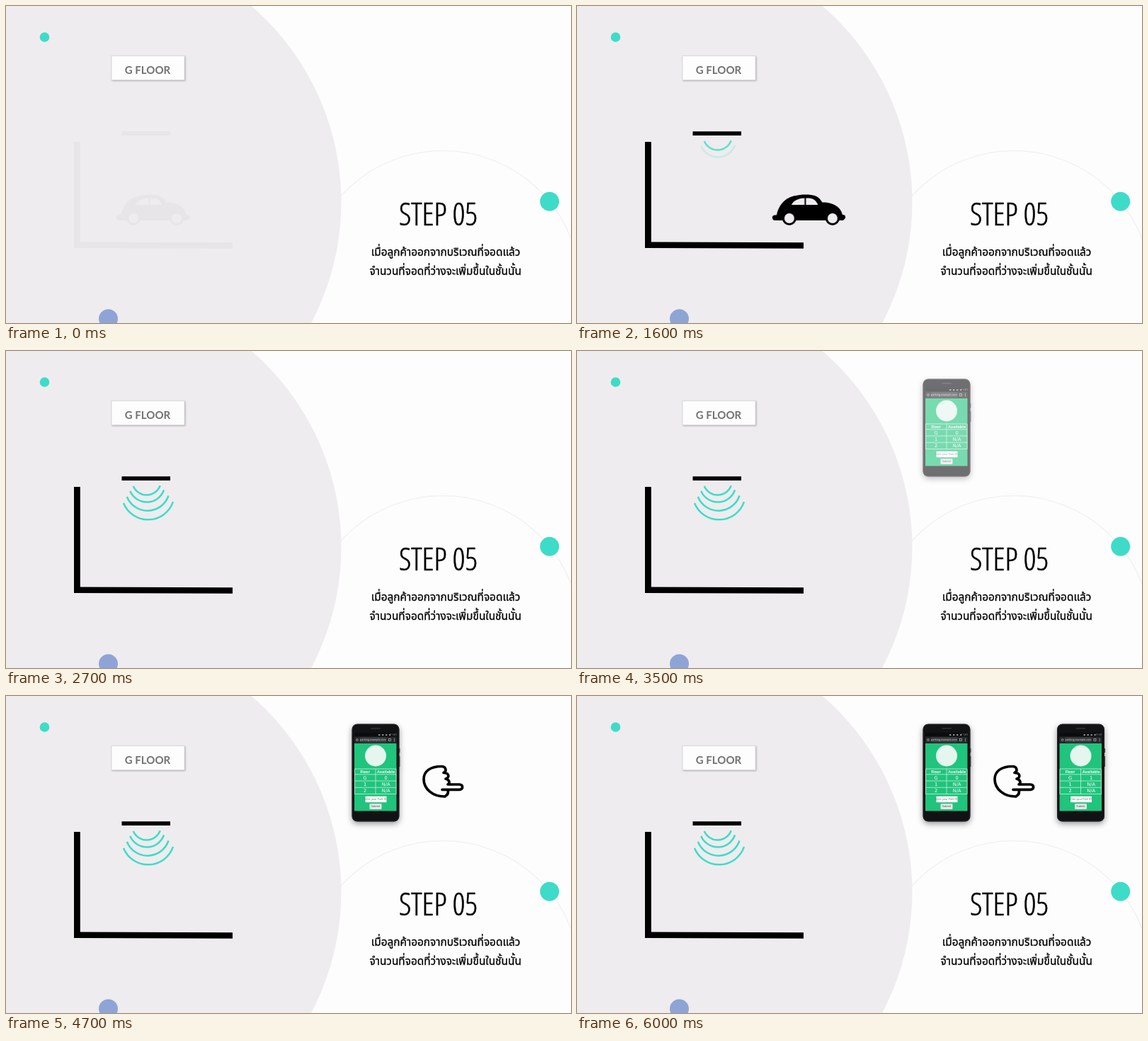
Animation of 798 by 448 pixels, one loop 6300 ms. Source, as an HTML page:

```html
<!DOCTYPE html>
<html lang="th">
<head>
<meta charset="utf-8">
<title>Step 05</title>
<style>
  html, body { margin: 0; width: 100%; height: 100%; overflow: hidden; background: #fefdfe; }
  svg { display: block; width: 100vw; height: 100vh; }

  .sign { font: 700 15px Lato, Inter, sans-serif; fill: #727273; }
  .title {
    font-family: "Open Sans Condensed Light", "Roboto Condensed Light", "Roboto Condensed", "Open Sans Condensed", sans-serif;
    font-size: 44px; font-weight: 300; font-stretch: condensed;
    stroke: #000; stroke-width: .6px;
  }
  .note { font: 15.4px "Noto Sans Thai", "Noto Sans", sans-serif; stroke: #000; stroke-width: .3px; }
  .cell { font: 6.6px "DejaVu Sans", sans-serif; fill: #fff; }
  .head { font: 700 5.4px "Open Sans", sans-serif; fill: #fff; }
  .tiny { font: 3.7px "Open Sans", sans-serif; }
  .phone { filter: drop-shadow(0 3px 4px #0006); }
  .wave { fill: none; stroke: #3edcc8; stroke-width: 2.5; }

  /* Every delay is counted from the start of the loop */
  .fade { animation: fade 500ms linear var(--at) both; }
  .scene { animation: fade 650ms linear -20ms both; }
  .car {
    animation: drive 1600ms cubic-bezier(.333, 0, .667, 1) 700ms both,
               leave 400ms linear 2300ms both;
  }
  .pulse { transform-origin: 522px 109px; animation: pulse 500ms linear var(--at) both; }

  @keyframes fade { from { opacity: 0; } to { opacity: 1; } }
  @keyframes leave { from { opacity: 1; } to { opacity: 0; } }
  @keyframes drive { from { transform: translateX(156px); } to { transform: translateX(358px); } }
  @keyframes pulse {
    from, to { opacity: 1; transform: scale(1); }
    50% { opacity: .5; transform: scale(1.05); }
  }
</style>
</head>
<body>
<svg viewBox="0 0 798 448" text-anchor="middle">
  <defs>
    <g id="phone">
      <path d="M555.8 74v6M555.8 85v15" stroke="#222"/>
      <rect x="488.5" y="39.5" width="67" height="138" rx="7.5" fill="#111214"/>
      <rect x="489.2" y="40.2" width="65.6" height="136.6" rx="6.9" fill="none" stroke="#2c2d30" stroke-width=".7"/>
      <rect x="515" y="45" width="14" height="1.6" rx=".8" fill="#333"/>
      <rect x="492" y="52" width="59.5" height="5.5" fill="#0b0c0d"/>
      <rect x="492" y="57.5" width="59.5" height="9.5" fill="#26282a"/>
      <path d="M526 55h2.4M531 55h2.4M536 55h2.4M541 55h2" stroke="#bbb" stroke-width="1.6"/>
      <text class="tiny" x="547.5" y="56.3" fill="#ccc">11:01</text>
      <rect x="500" y="58.6" width="37" height="6.8" rx="1" fill="#3c3f42"/>
      <circle cx="496" cy="62" r="1.4" fill="none" stroke="#bbb" stroke-width=".7"/>
      <rect x="540.5" y="60.5" width="3" height="3" fill="none" stroke="#bbb" stroke-width=".7"/>
      <path d="M548.5 60v4.5" stroke="#bbb" stroke-dasharray="1 .7"/>
      <text class="tiny" x="518.5" y="63.3" fill="#ddd">parking.example.com</text>
      <rect x="492" y="67" width="59.5" height="95.5" fill="#20c47c"/>
      <circle cx="522" cy="84.5" r="15" fill="#e4f6ee"/>
      <path d="M492.5 103H551V138.5H492.5ZM492.5 110.8H551M492.5 120H551M492.5 129.3H551M522 103V138.5"
            fill="none" stroke="#c4f0dc" stroke-width=".8"/>
      <g class="head"><text x="507" y="108.8">Floor</text><text x="536.7" y="108.8">Available</text></g>
      <g class="cell">
        <text x="507" y="117.8">G</text>
        <text x="507" y="127">1</text><text x="536.7" y="127">N/A</text>
        <text x="507" y="136.3">2</text><text x="536.7" y="136.3">N/A</text>
      </g>
      <rect x="507.5" y="141.7" width="30" height="8.5" rx=".8" fill="#fff"/>
      <text class="tiny" x="521.5" y="147.2" fill="#666">Enter your Park ID</text>
      <rect x="513.5" y="152.3" width="17" height="7.7" rx="1.2" fill="#e6e8e7"/>
      <text class="tiny" x="522" y="157.4" fill="#333">Submit</text>
    </g>
  </defs>

  <rect width="798" height="448" fill="#fefdfe"/>
  <circle cx="617" cy="398.5" r="194" fill="none" stroke="#f1f1f3" stroke-width="1.5"/>
  <circle cx="107.5" cy="277" r="366" fill="#eeecee"/>
  <circle cx="54.5" cy="44" r="6.8" fill="#3edcc8"/>
  <circle cx="767.7" cy="276.3" r="13.5" fill="#3edcc8"/>
  <circle cx="144.5" cy="442" r="13.5" fill="#8fa4d6"/>

  <rect x="149" y="70.5" width="103" height="34" fill="#fefdfe" stroke="#d6d6d9" stroke-width=".8"
        style="filter: drop-shadow(1.5px 1.5px 1.2px #0004)"/>
  <text class="sign" x="200" y="95.7">G FLOOR</text>

  <text class="title" x="610.5" y="309.7">STEP 05</text>
  <text class="note" x="621" y="352.6">เมื่อลูกค้าออกจากบริเวณที่จอดแล้ว</text>
  <text class="note" x="620.7" y="379.6">จำนวนที่จอดที่ว่างจะเพิ่มขึ้นในชั้นนั้น</text>

  <g class="scene">
    <path d="M163.5 177.2H232V183H163.5ZM96 192H104.8V333.5L320 334.3V342.8L96 342Z"/>
    <g class="car">
      <path d="M0 299Q0 295.5 4 295.5H6C8 284 16 272 30 268.5C42 265.5 54 266 60 268C66 270 69 275 70.5 277.5C85 277 97 284 99 295H101Q104 296 103 300L100 303H3Q0 302 0 299Z"/>
      <path d="M27 281C30 275 36 272 45.5 271.5V281ZM47.5 271.5C56 271 61 273 64.5 281H47.5Z" fill="#eeecee"/>
      <circle cx="24" cy="300" r="10"/><circle cx="24" cy="300" r="7" fill="#eeecee"/>
      <circle cx="85" cy="300" r="10"/><circle cx="85" cy="300" r="7" fill="#eeecee"/>
    </g>
  </g>

  <path class="wave fade" style="--at: 1200ms" d="M179.8 191A20.4 20.4 0 0 0 217.7 190.3"/>
  <path class="wave fade" style="--at: 1500ms" d="M175.3 198A25.6 25.6 0 0 0 223 196.5"/>
  <path class="wave fade" style="--at: 1850ms" d="M170.8 206A31.3 31.3 0 0 0 229.5 204.5"/>
  <path class="wave fade" style="--at: 2200ms" d="M166 215A37.4 37.4 0 0 0 236 213.2"/>

  <g class="fade" style="--at: 3200ms">
    <g class="pulse" style="--at: 3700ms">
      <g class="phone"><use href="#phone"/><text class="cell" x="536.7" y="117.8">0</text></g>
    </g>
  </g>

  <path class="fade" style="--at: 4200ms" fill="none" stroke="#000" stroke-width="3.7"
        stroke-linecap="round" stroke-linejoin="round"
        d="M620 142C603 142.5 590 131.5 590 117.5C590 106.5 599 99.5 615 99.5C621.5 99.5 623 106.5 618 108.5C626 108.5 627 115.5 621 117C627 118.5 627 123.5 624 125H640.5C646 125 646 132.3 640.5 132.3H616M624 132.3Q626 138.5 620 142"/>

  <g transform="translate(189.5 0)">
    <g class="fade" style="--at: 4800ms">
      <g class="pulse" style="--at: 5400ms">
        <g class="phone"><use href="#phone"/><text class="cell" x="536.7" y="117.8">1</text></g>
      </g>
    </g>
  </g>
</svg>
<script>
  const LOOP = 6300, STEP = 100;
  const parts = document.getAnimations();
  const start = performance.now();
  parts.forEach(part => part.pause());

  // Hold each pose for one step, as the motion runs at ten pictures a second
  function tick() {
    const time = Math.floor((performance.now() - start) % LOOP / STEP) * STEP;
    parts.forEach(part => { part.currentTime = time; });
    requestAnimationFrame(tick);
  }

  tick();
</script>
</body>
</html>
```
